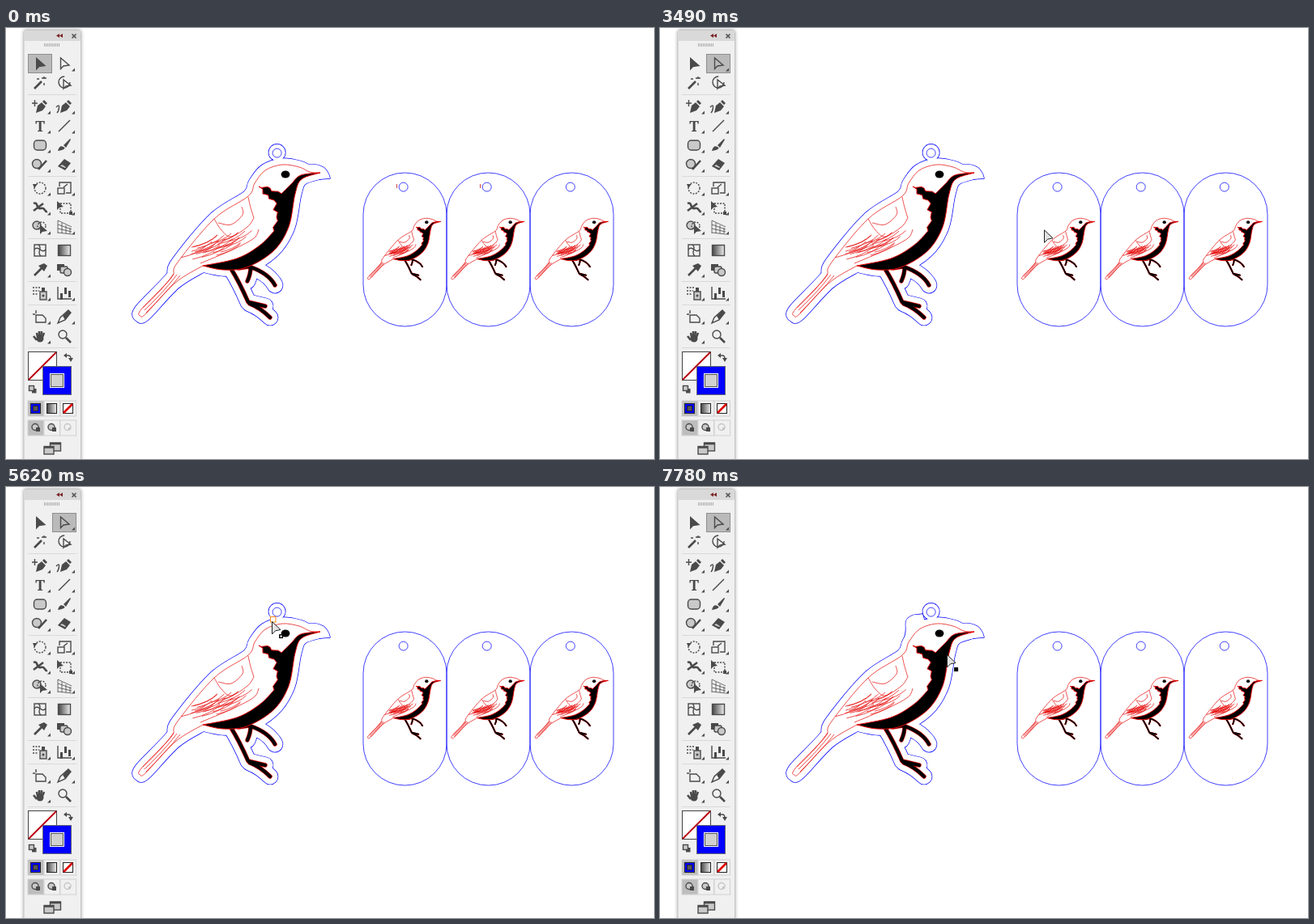
An HTML page that plays this animation: 800x533 px, repeating every 8000 ms.

```html
<!DOCTYPE html>
<html lang="en">
<head>
<meta charset="utf-8">
<title>Editing an outline</title>
<style>
  html, body { margin: 0; width: 100%; height: 100%; overflow: hidden; background: #fff; }
  svg { display: block; width: 800px; height: 533px; }
  path, rect, circle { fill: none; }
  .cut { stroke: #00f; stroke-width: .75; }
  #halo { --edge: #00f; stroke-linejoin: round; stroke-linecap: round; }
  #halo path, #halo circle { stroke: var(--c); }
  #halo .solid { fill: #fff; }
  .line { stroke: #e60000; stroke-width: .7; vector-effect: non-scaling-stroke; }
  .ink { fill: #000; stroke: #e60000; stroke-width: 1; vector-effect: non-scaling-stroke; }
  .limb { stroke-linecap: round; stroke-linejoin: round; }
  .icon { stroke: #4a4a4a; stroke-width: 1.4; }
  .icon .f { fill: #4a4a4a; stroke: none; }
  .icon .b { stroke-width: 2.6; }
  .icon .g { fill: #c9c9c9; }
  .icon .fade { fill: url(#fade); }
  .icon text { font: bold 18px "Noto Serif", serif; fill: #4a4a4a; stroke: none; }
  .hot { stroke: #ff6a00; }
  .dot { fill: #ff5a00; }
  .knob { fill: #fff; stroke: #ff8a1c; }
</style>
</head>
<body>
<svg id="stage" viewBox="0 0 800 533"></svg>
<script>
const $ = id => document.getElementById(id);
const path = (d, c = '', more = '') => `<path d="${d}" class="${c}" ${more}/>`;
const box = (x, y, w, h, c = '', more = '') =>
  `<rect x="${x}" y="${y}" width="${w}" height="${h}" class="${c}" ${more}/>`;
const tint = (x, y, w, h, fill, line = 'none') => box(x, y, w, h, '', `style="fill:${fill};stroke:${line}"`);
const disc = (x, y, r, c = '', more = '') => `<circle cx="${x}" cy="${y}" r="${r}" class="${c}" ${more}/>`;
const times = (n, f) => Array.from({ length: n }, (_, i) => f(i)).join('');

let seed = 7;
const rnd = () => (seed = seed * 16807 % 2147483647) / 2147483647;

/* ---------- curves ---------- */
const points = s => s.split(' ').map(p => p.split(',').map(Number));
// smooth curve through points, without the leading move
function spline(s) {
  const p = points(s), at = i => p[Math.max(0, Math.min(p.length - 1, i))];
  const ctrl = (a, b, c) => a.map((v, j) => (v + (c[j] - b[j]) / 6).toFixed(1)).join(' ');
  return p.slice(1).map((q, i) =>
    `C${ctrl(p[i], at(i - 1), q)} ${ctrl(q, at(i + 2), p[i])} ${q.join(' ')}`).join('');
}
const curve = s => 'M' + s.split(' ')[0] + spline(s);
// ragged edge along a polyline
function ragged(s, size) {
  const p = points(s);
  return p.slice(1).map(([x, y], i) => {
    const [a, b] = p[i], n = Math.max(2, Math.round(Math.hypot(x - a, y - b) / 5));
    return times(n, j => {
      const k = (j + 1) / n, w = j < n - 1 ? (j % 2 ? -1 : 1) * size * (.5 + rnd()) : 0;
      return `L${(a + (x - a) * k + w).toFixed(1)} ${(b + (y - b) * k - w * .5).toFixed(1)}`;
    });
  }).join('');
}

/* ---------- bird ---------- */
const back = '388,179 375,178 362,172 341,169 320,176 307,192 299,208 257,236 211,291 204,309 167,348 166,356 173,353 209,315 243,294';
const belly = '243,294 268,299 297,296 330,276 349,246 357,205 365,187 388,179';
const body = curve(back) + spline(belly) + 'Z';
const breast = curve(belly) + spline('388,179 364,182 352,193 340,205') +
  ragged('340,205 326,198 312,196 317,205 331,213 334,234 331,251', 2) +
  spline('331,251 313,269 285,285 243,294') + 'Z';
const legs = ['M278 298Q288 314 299 339L320 344M301 341Q314 346 326 358',
  'M287 297L300 295Q324 303 332 318M302 296Q302 304 298 313'];
const details = ['257,236 266,250 278,258 298,246 306,235', '291,221 292,231 278,243 262,241',
  '299,209 302,222 306,235', '312,249 306,260 280,274 240,291'].map(s => path(curve(s), 'line')).join('');
const strands = times(24, i => {
  const row = i % 3, col = i >> 2, len = .7 + .6 * rnd();
  return path(`M${261 + 8.5 * col - 7 * row} ${255 - col + 7 * row + 3 * rnd()}q${-9 * len} ${9 * len} ${-27 * len} ${13 * len}`, 'line');
});
const tail = times(3, i => path(`M${207 + 4 * i} ${304 + i}Q${193 + 3 * i} ${324 + i} ${169 + 2 * i} ${346 + 3 * i}`, 'line'));
const limbs = [['#e60000', 5.4], ['#000', 4.2]].map(([c, w]) =>
  legs.map(d => path(d, 'limb', `stroke="${c}" stroke-width="${w}"`)).join('')).join('');
const bird = `<g id="bird">${path(curve(back), 'line')}${details}${strands}${tail}${limbs}` +
  `${path(breast, 'ink')}<ellipse cx="345" cy="181" rx="5.4" ry="4.600"/></g>`;

/* ---------- cut lines: the silhouette grown by 8 px ---------- */
function bulge(k) {
  const x = 315 - 8 * k, y = 170 - 8.5 * k;
  return `M300 190C308 176 ${x - 8 * k} ${y + 6} ${x} ${y}S318 159 ${327 - 3 * k} ${163 - 6 * k}`;
}
function layer(color, grow) {
  const wide = r => `stroke-width="${2 * (r + grow)}"`, thin = `stroke-width="${grow > 0 ? 1.4 : 0}"`;
  return `<g style="--c:${color}">${path(body, 'solid', wide(8))}` +
    legs.map(d => path(d, '', wide(10))).join('') +
    path('M370 169Q396 166 400 186L372 188Z', 'solid', thin) + disc(334.6, 153.9, 10.2, 'solid', thin) +
    path(bulge(1) + 'L330 176Z', 'solid bump', thin) + '</g>';
}
const halo = `<g id="halo">${layer('var(--edge)', .35)}${layer('#fff', -.35)}</g>`;
const tags = times(3, i => box(441 + 103 * i, 179, 103, 190, 'cut', 'rx="51.5"') +
  disc(490.6 + 103.1 * i, 196.6, 5.5, 'cut') +
  `<use href="#bird" transform="translate(${380.6 + 103.4 * i} 167.4) scale(.402)"/>`);

/* ---------- tool panel ---------- */
const nib = 'M-5 8L-3-1 2-5 7 0 3 5ZM3-6L5-8 9-4 7-2Z';
const dashed = 'stroke-dasharray="2 1.5"';
const icons = [
  path('M-5-8V8.5L-1 4.3 7.5 3Z', 'f'),
  path('M-4.5-7V6.5L-1 3 6 2Z'),
  path('M-7 7L2-2', 'b') + path('M5-8V-5M2-6H8M5 0V3M-4-5H-1'),
  disc(0, -1, 7, '', 'stroke-dasharray="33 11"') + path('M-1-4V7L2 4 8 3Z'),
  path(nib, 'f') + path('M-10-4H-3M-6.5-8V0'),
  path(nib, 'f') + path('M-10 1C-4-6-7 6-9 8'),
  '<text text-anchor="middle" y="6.5">T</text>',
  path('M-7 7L7-7'),
  box(-7.5, -6, 15, 12, 'g', 'rx="4"'),
  path('M-8 7Q-6-1-1 2T-8 7ZM-1 0L7-8 8-7 2 3Z', 'f'),
  disc(-4, -1, 5.5, 'g') + path('M-2 6L8-5', 'b'),
  path('M-8 2L0-7 8-2 1 7Z', 'f') + path('M-6 2L-3-1 3 3 1 5Z', 'g'),
  disc(0, 0, 7, '', dashed) + path('M-9-5L-3-5-7 0Z', 'f'),
  box(-8, 0, 8, 7) + path('M-6-2V-7H8V6H2M-1-1L4-5'),
  path('M-8-5C-2-8-5 3 1 1S5 6 9 5M-8 4L4-5', 'b'),
  box(-5, -5, 13, 12, '', dashed) + path('M-9-8V3L-6 0-1-1Z', 'f') + box(6, 5, 4, 4, 'f'),
  disc(-4, -2, 5, 'g') + disc(2, -1, 5, '', dashed) + path('M0-3V9L3 6 9 5Z', 'f'),
  times(4, i => path(`M${5 * i - 8} ${3 * i - 8}V8M-8 ${5 * i - 8}L9 ${3 * i}`, '', 'stroke-width=".8"')),
  box(-7, -7, 14, 14) + path('M-7-1C-2-7 2 5 7-1M-2-7C4-2-5 2 1 7'),
  box(-7.5, -6.5, 15, 13, 'fade'),
  path('M-7 7L2-2', 'b') + path('M-2-5L5 2 9-5 5-8Z', 'f'),
  box(-9, -7, 9, 8, 'f') + box(-5, -4, 9, 8, 'g', 'rx="2"') + disc(4, 3, 4.5, 'g'),
  box(0, -2, 8, 10, 'g') + box(2, -7, 4, 5, 'f') + disc(4, 3, 1.5, 'f') + path('M-9-7H1M-9-3H-1M-9 1H-3', '', dashed),
  path('M-8-8V7H9') + times(3, i => box(5 * i - 5, [0, -7, -3][i], 3, 8, 'f')),
  path('M-5-2H3L7 2V7H-5ZM-9-3H-6M-5-8V-4'),
  path('M-8 8L-5 1 5-8 8-5 1 4Z') + path('M-2-1L5-8 8-5 1 4Z', 'f'),
  times(4, i => path(`M${2 * i - 3} 1L${3 * i - 4} ${i % 3 ? -6 : -4}`, 'b')) + path('M-8 0L-4 5', 'b') + disc(0, 3, 4.5, 'f'),
  disc(-2, -2, 5) + path('M2 2L8 8', 'b')
];
let y = 44, slot = 0, tools = '';
for (const rows of [2, 4, 3, 2, 1, 2]) {
  for (let i = 0; i < rows * 2; i++, slot++) {
    const x = i % 2 ? 72 : 42, plain = slot % 27 === 0 || [2, 3, 18, 19, 21].includes(slot);
    tools += `<g class="icon" transform="translate(${x} ${y})">${icons[slot]}${plain ? '' : path('M13 5.5v4h-4z', 'f')}</g>`;
    if (i % 2) y += 24;
  }
  tools += path(`M27 ${y - 9.5}H87`, '', 'stroke="#d9d9d9"');
  y += 5;
}
const modes = times(3, i => {
  const x = 27 + 20 * i, bg = i ? '#f0f0f0' : '#bdbdbd';
  return tint(x, 461, 19.5, 19, bg, '#d2d2d2') + tint(x, 485, 19.5, 19, bg, '#d2d2d2') +
    tint(x + 3.5, 464.5, 12, 12, ['#00f', 'url(#fade)', '#fff'][i], '#222') +
    `<g class="icon" ${i > 1 ? 'id="inside"' : ''}>${disc(x + 9, 493.5, 4, i > 1 ? '' : 'g')}${box(x + 10, 494, 5 - 2 * (i > 1), 5 - 2 * (i > 1), 'f')}</g>`;
});
const panel = box(22, 2.5, 70.5, 540, '', 'rx="3" style="fill:#f0f0f0;stroke:#c4c4c4;filter:drop-shadow(0 0 2px #aaa)"') +
  tint(22.5, 3, 69.5, 13, '#d9d9d9') +
  path('M66 7v5l-4-2.5zM70 7v5l-4-2.5z', '', 'style="fill:#7a2222"') +
  path('M81.5 7.5l5 5m0-5l-5 5', '', 'stroke="#555" stroke-width="1.7"') +
  times(10, i => path(`M${47.5 + 2 * i} 19v4`, '', 'stroke="#aaa"')) +
  box(27.5, 32.5, 29, 23, '', 'id="btnA"') + box(57.5, 32.5, 29, 23, '', 'id="btnB"') + tools +
  tint(27.5, 400.5, 35, 35, '#fff', '#444') +
  path('M28 435L62 401', '', 'stroke="#b8000c" stroke-width="1.8"') +
  tint(45.5, 418.5, 35, 35, '#00f', '#667') + tint(54.5, 427.5, 17, 17, '#d0d0d0', '#fff') +
  tint(55.5, 428.5, 15, 15, 'none', '#555') +
  `<g class="icon">${path('M74 405H77Q80 405 80 409') + path('M71 405l4-3v6zM77 408h6l-3 5z', 'f') +
    box(32, 446, 5.5, 5.5, 'f') + box(28.5, 442.5, 6, 6, 'g')}</g>` + modes +
  tint(33.5, 467.5, 6, 6, '#555', '#223') + path('M71 476L82 465', '', 'stroke="#e00000" stroke-width="2.6"') +
  `<g class="icon">${box(54.5, 513, 13, 10, 'g') + box(47, 517.5, 12, 9.5, 'g') + path('M54.5 514H67.5M47 518.5H59', 'b')}</g>`;

$('stage').innerHTML = `
  <defs><linearGradient id="fade"><stop stop-color="#444"/><stop offset="1" stop-color="#eee"/></linearGradient></defs>
  ${halo}${disc(334.6, 154.6, 5.5, 'cut')}${bird}${tags}
  ${path('M482.5 193v5M585.5 193v5', '', 'id="ticks" stroke="#c33" stroke-width=".9"')}
  ${path('', 'hot', 'id="preview"')}
  <g id="handles">${path('M297 165.5L324 156.5M300 189L310 177', 'hot')}
    ${disc(297.5, 165.5, 2.5, 'dot')}${disc(306.5, 159.5, 2.5, 'dot')}${disc(324.5, 157.5, 2.5, 'dot')}
    ${box(298, 187, 4, 4, 'knob')}${box(322, 152, 4, 4, 'knob')}</g>
  ${box(326.5, 160.5, 6.5, 6.5, 'knob', 'id="snap"')}
  ${panel}
  <g id="cursor">${path('', '', 'id="point"')}${box(9.8, 16.8, 3.6, 3.6, '', 'id="mark" stroke-width="1.4"')}
    ${path('M10.5 25Q9 17 18 17.5', '', 'id="arc" stroke="#000" stroke-width="1.2"')}</g>`;

/* ---------- motion ---------- */
const LOOP = 8000, TICK = 77;
// pointer moves: start, end, then where to
const moves = [[1160, 1690, 109, 77], [1690, 1920, 81, 45], [3180, 3650, 527, 277], [3650, 4050, 392, 231],
  [4050, 4450, 331, 158], [4690, 5060, 323, 164], [5290, 5620, 328, 166], [6070, 6310, 309, 162],
  [6610, 7000, 350, 143], [7000, 7390, 374, 168], [7460, 7780, 354, 207]];
// progress between two times, advancing once per pointer update
const progress = (t, a, b) => t >= b ? 1 : Math.max(0, Math.floor((t - a + 3) / TICK) * TICK / (b - a));
function pointer(t) {
  let x = 790, y = 470;
  for (const [a, b, tx, ty] of moves) {
    const k = progress(t, a, b), e = k * (2 - k);
    x += (tx - x) * e;
    y += (ty - y) * e;
  }
  return [x, y];
}
const show = (id, on) => $(id).style.display = on ? '' : 'none';
const paint = (id, fill, stroke) => Object.assign($(id).style, { fill, stroke });
const button = (id, state) => paint(id, ...{ off: ['none', 'none'], hover: ['#e6e6e6', '#c4c4c4'], on: ['#bababa', '#8f8f8f'] }[state]);
const pointers = {
  solid: ['M0 0V17L5 12.5 12 10Z', '#000', 'none'],
  system: ['M.5 .5V16L4 12.8 6.6 18.5 9 17.5 6.5 11.8H11.2Z', '#fff', '#111'],
  direct: ['M.5 .5V16L4.6 11.8 11 10.5Z', '#e2e2e2', '#222']
};

function draw(t) {
  const [x, y] = pointer(t), during = (a, b) => t >= a && t < b;
  const [shape, fill, line] = pointers[t < 2010 ? 'solid' : x < 93 ? 'system' : 'direct'];
  show('cursor', t >= 1160);
  $('cursor').setAttribute('transform', `translate(${x.toFixed(1)} ${y.toFixed(1)})`);
  $('point').setAttribute('d', shape);
  paint('point', fill, line);

  button('btnA', t < 2550 ? 'on' : 'off');
  button('btnB', t >= 2550 ? 'on' : t >= 1844 ? 'hover' : 'off');
  show('ticks', t < 2700);

  const drag = during(5920, 6686), overPath = t >= 7700;
  $('halo').style.setProperty('--edge', during(5920, 6610) ? '#ff6a00' : '#00f');
  document.querySelectorAll('.bump').forEach(b => b.style.display = t >= 6686 ? '' : 'none');
  $('preview').setAttribute('d', bulge(progress(t, 6070, 6310)));
  show('preview', drag);
  show('arc', drag);
  show('handles', during(6310, 7000));
  show('snap', during(5550, 5920));
  show('mark', during(5380, 5920) || overPath);
  paint('mark', overPath ? '#000' : '#fff', '#000');
  $('inside').style.opacity = during(6610, 7000) ? 1 : .25;
}

const start = performance.now();
function tick() {
  draw((performance.now() - start) % LOOP);
  requestAnimationFrame(tick);
}
tick();
</script>
</body>
</html>
```
